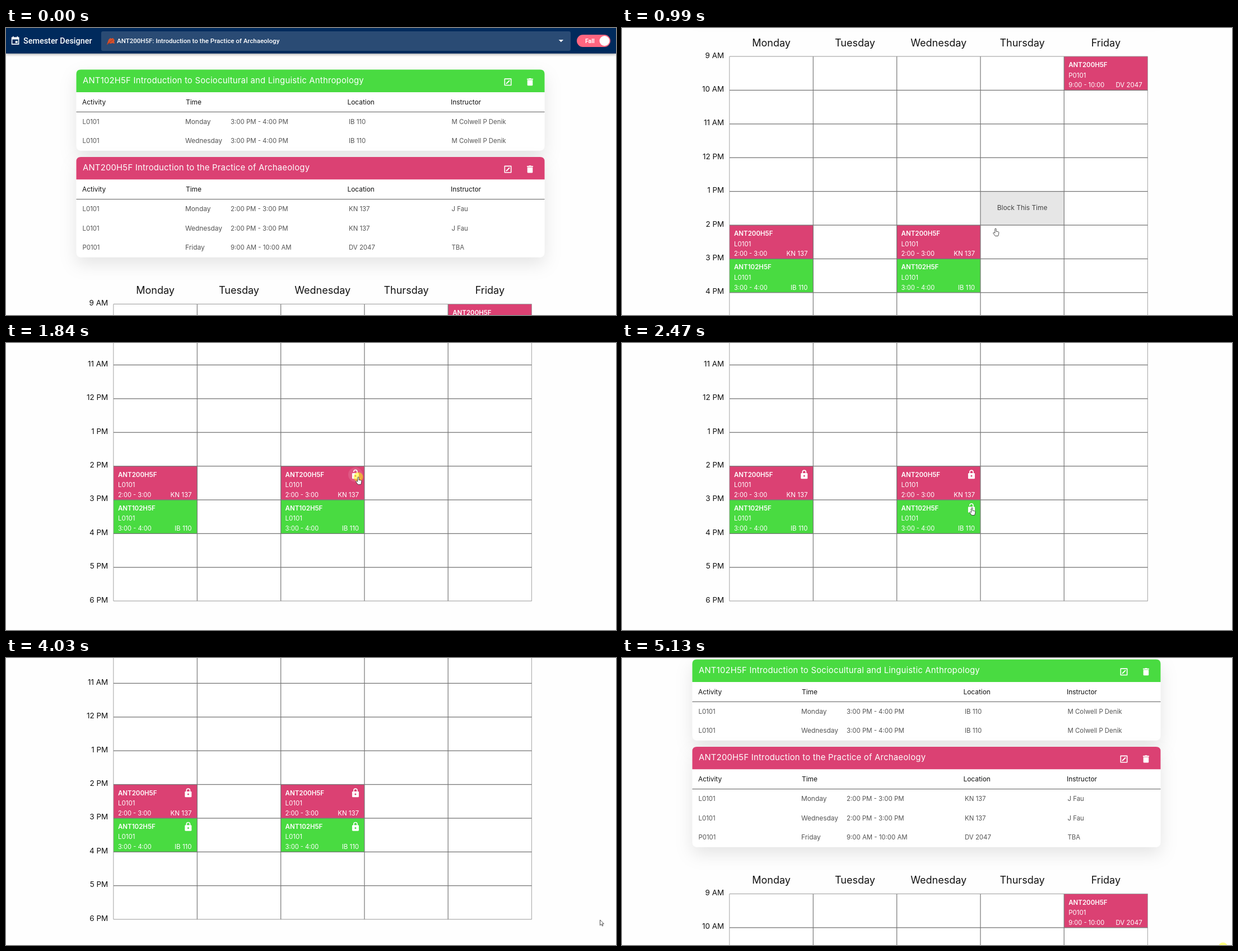
An HTML page that plays this animation: 1089 by 514 pixels, repeating every 5.22 s.

```html
<!DOCTYPE html>
<html lang="en">
<head>
<meta charset="utf-8">
<title>Timetable</title>
<style>
  html, body { margin: 0; width: 100%; height: 100%; overflow: hidden; background: #fefefe; }
  svg { display: block; width: 1089px; height: 514px; font-family: Inter, "Open Sans", sans-serif; }
  .bar { font-family: Roboto, Arial, sans-serif; font-weight: 500; }
  .card { filter: drop-shadow(0 12px 15px rgba(0, 0, 0, .1)); }
  .head { filter: drop-shadow(0 2px 2px rgba(0, 0, 0, .3)); }
</style>
</head>
<body>
<svg id="stage" viewBox="0 0 1089 514"></svg>
<script>
const GREEN = '#49db41', PINK = '#db4173';
const LOOP = 5220, STEP = 77.8, LEAD = 27;
const COL = 149.3, ROW = 60.4, GRID_X = 192, GRID_Y = 494.5;
const DAYS = ['Monday', 'Tuesday', 'Wednesday', 'Thursday', 'Friday'];

const text = (x, y, str, size = 11.5, fill = '#111', extra = '') =>
  `<text x="${x}" y="${y}" font-size="${size}" fill="${fill}" ${extra}>${str}</text>`;
const rect = (x, y, w, h, fill, extra = '') =>
  `<rect x="${x}" y="${y}" width="${w}" height="${h}" fill="${fill}" ${extra}/>`;
const path = (d, fill = 'none', extra = '') => `<path d="${d}" fill="${fill}" ${extra}/>`;
const circle = (x, y, r, fill, extra = '') =>
  `<circle cx="${x}" cy="${y}" r="${r}" fill="${fill}" ${extra}/>`;
const at = (x, y, body, extra = '') => `<g transform="translate(${x} ${y})" ${extra}>${body}</g>`;

function header() {
  const calendar = path('M10.6 17.5h12v11.4h-12z', 'none', 'stroke="#fff" stroke-width="1.6"') +
    rect(10, 16.5, 13.2, 4, '#fff') + rect(12, 14.8, 1.6, 3, '#fff') +
    rect(19.6, 14.8, 1.6, 3, '#fff') + rect(16.8, 23.2, 3.8, 3.8, '#fff');
  const leaf = path('M181 27l2-6 3-3 2 1 3-1 3 4-1 2 1 4-4-1-3 1-3-1-2 2-2 1z', '#d5502c') +
    path('M181 29l5-4 5-4', 'none', 'stroke="#8c2f1b" stroke-width=".8"');
  return rect(0, 0, 1089, 45.7, '#002a5c', 'class="head"') +
    `<g class="bar">${calendar}` +
    text(31, 28, 'Semester Designer', 14.4, '#fff') +
    rect(170, 6, 838, 35, '#2a4b74', 'rx="3"') + leaf +
    text(198, 27, 'ANT200H5F: Introduction to the Practice of Archaeology', 11.5, '#fff') +
    path('M986.7 21h8.4l-4.2 4.3z', '#fff') +
    rect(1019, 12, 60, 22, '#ff6680', 'rx="11"') +
    text(1034, 26.7, 'Fall', 10.5, '#fff', 'font-weight="700"') + circle(1068.5, 23, 9, '#fff') + '</g>';
}

function card(y, color, title, rows) {
  const h = 75.8 + rows.length * 34.7;
  const edit = path('M890.3 16.5h11.4v11.4h-11.4z', 'none', 'stroke="#fff" stroke-width="1.6" stroke-linejoin="round"') +
    path('M893 25.3l6-6', 'none', 'stroke="#fff" stroke-width="2"');
  const trash = path('M930 16.2h3l.8-.8h3.4l.8.8h3v1.6h-11zM930.7 18.7h9.6v8.6q0 1.4-1.4 1.4h-6.8q-1.4 0-1.4-1.4z', '#fff');
  let s = rect(125.5, 0, 836, h, '#fff', 'rx="8" class="card"') +
    path('M125.5 40.4v-32.4q0-8 8-8h820q8 0 8 8v32.4z', color) +
    text(137, 24.6, title, 14.8, '#fff', 'letter-spacing=".25"') + edit + trash +
    rect(125.5, 75.2, 836, 1.1, '#666');
  ['Activity', 'Time', 'Location', 'Instructor'].forEach((t, i) =>
    s += text([136, 321, 609.5, 794][i], 62.3, t, 11.9, '#111'));
  rows.forEach((row, r) => row.forEach((t, i) =>
    s += text([136.5, 320, 401, 612, 795.5][i], 97.3 + r * 34.6, t, i === 1 ? 11.9 : 11.4, '#555')));
  return at(0, y, s);
}

const blockPos = (day, hour) => [GRID_X + day * COL, GRID_Y + (hour - 9) * ROW];

function block(day, hour, color, code, activity, time, room) {
  return at(...blockPos(day, hour), rect(0, 0, COL, ROW, color) +
    text(8, 19, code, 11.5, '#fff', 'font-weight="600"') +
    text(8, 37.5, activity, 11.5, '#fff') + text(8, 55.3, time, 11.1, '#fff') +
    text(139.5, 55.3, room, 11.5, '#fff', 'text-anchor="end"'));
}

function lock(day, hour, color, open) {
  const [x, y] = blockPos(day, hour);
  const shackle = open ? 'M-6.3-4.5v-.5a3 3 0 0 1 6.2 0v3' : 'M-3.1-2v-2.3a3.1 3.1 0 0 1 6.2 0v2.3';
  return at(x + 133.3, y + 15, rect(-6, -2.6, 12, 10.4, '#fff', 'rx="1.4"') +
    path(shackle, 'none', `stroke="#fff" stroke-width="1.6" ${open ? 'transform="translate(3.1 0)"' : ''}`) +
    circle(0, 2.6, 1.5, color));
}

function glow(day, hour, alpha) {
  const [x, y] = blockPos(day, hour);
  return circle(x + 133.3, y + 15.3, 13, '#fff', `opacity="${alpha}"`);
}

function gridLines() {
  let s = '';
  for (let i = 0; i < 6; i++)
    s += rect(GRID_X - .6 + i * COL, GRID_Y, i % 5 ? 1.2 : .9, 9 * ROW, i % 5 ? '#777' : '#999');
  for (let i = 0; i < 10; i++) {
    const hour = (i + 8) % 12 + 1, y = GRID_Y + i * ROW;
    s += rect(GRID_X, y - .6, 5 * COL, i % 9 ? 1.3 : 1, i % 9 ? '#777' : '#999') +
      text(182.3, y + 2.5, `${hour} ${i < 3 ? 'AM' : 'PM'}`, 13.5, '#111', 'text-anchor="end"');
  }
  DAYS.forEach((d, i) => s += text(GRID_X + (i + .5) * COL, 476, d, 18, '#111', 'text-anchor="middle"'));
  return s;
}

const staff = 'M Colwell P Denik', tutor = 'J Fau';
const page = header() +
  card(74.6, GREEN, 'ANT102H5F Introduction to Sociocultural and Linguistic Anthropology',
    ['Monday', 'Wednesday'].map(d => ['L0101', d, '3:00 PM - 4:00 PM', 'IB 110', staff])) +
  card(230.9, PINK, 'ANT200H5F Introduction to the Practice of Archaeology', [
    ['L0101', 'Monday', '2:00 PM - 3:00 PM', 'KN 137', tutor],
    ['L0101', 'Wednesday', '2:00 PM - 3:00 PM', 'KN 137', tutor],
    ['P0101', 'Friday', '9:00 AM - 10:00 AM', 'DV 2047', 'TBA']]) +
  rect(GRID_X, GRID_Y, 5 * COL, 9 * ROW, '#fff') +
  '<g id="hover"></g>' +
  block(4, 9, PINK, 'ANT200H5F', 'P0101', '9:00 - 10:00', 'DV 2047') +
  [0, 2].map(d => block(d, 14, PINK, 'ANT200H5F', 'L0101', '2:00 - 3:00', 'KN 137') +
    block(d, 15, GREEN, 'ANT102H5F', 'L0101', '3:00 - 4:00', 'IB 110')).join('') +
  gridLines() + '<g id="locks"></g>';

const stage = document.getElementById('stage');
stage.innerHTML = `<g id="page">${page}</g><g id="pointer"></g>`;
const part = id => document.getElementById(id);

const ARROW = path('M0 0v9.8l2.3-2.1 1.6 3.4 1.5-.7-1.6-3.3h3.1z', '#fff', 'stroke="#222" stroke-width=".8"');
const HAND = path('M-1.2 8.2V1.2q0-1.2 1.1-1.2t1.1 1.2v4l3.6.7q1.3.3 1.2 1.6l-.5 3.4-1 2.6h-5l-3.4-4.7q-.6-1 .4-1.5.9-.3 1.5.4z',
  '#fff', 'stroke="#222" stroke-width=".8"');

// Keys are [step, value, ...], joined by straight lines
const SCROLL = [[0, 0], [6, 289], [7, 432], [11, 432], [13, 443.5], [15, 540], [17, 576],
  [51, 576], [52, 570], [53, 330], [54, 80], [55, 72]];
const POINTER = [[0, 1073, 518], [6, 711, 336], [10, 711, 336], [13, 667, 359], [17, 602, 246],
  [21, 629, 240], [25, 629, 240], [30, 624, 267], [32, 625, 295], [47, 625, 295],
  [52, 1060.5, 469], [56, 1060.5, 469], [60, 1073, 518]];

function track(keys, n) {
  const i = keys.findIndex(k => k[0] > n);
  if (i < 0) return keys[keys.length - 1].slice(1);
  const a = keys[i - 1], b = keys[i], f = (n - a[0]) / (b[0] - a[0]);
  return a.slice(1).map((v, j) => v + (b[j + 1] - v) * f);
}

function locks(n) {
  let s = '';
  if (n >= 20 && n < 29) s += glow(2, 14, .12);
  if (n >= 35 && n < 48) s += glow(2, 15, n < 40 ? .22 : .15);
  if (n >= 26) s += lock(0, 14, PINK) + lock(2, 14, PINK);
  else if (n >= 17) s += lock(2, 14, PINK, true);
  if (n >= 36) s += lock(0, 15, GREEN) + lock(2, 15, GREEN);
  else if (n >= 31) s += lock(2, 15, GREEN, true);
  return s;
}

function blockHint(n) {
  if (n < 7 || n > 13) return '';
  const [x, y] = blockPos(3, 13);
  return rect(x, y, COL, ROW, '#e6e6e6') +
    text(x + COL / 2, y + 33.7, 'Block This Time', 11.9, '#444', 'text-anchor="middle"');
}

let last = -1;
function draw(now) {
  const n = Math.floor((now % LOOP + LEAD) / STEP);
  if (n !== last) {
    last = n;
    const [x, y] = track(POINTER, n);
    const click = n === 24 || n === 25 || n === 35 || n >= 66;
    part('page').setAttribute('transform', `translate(0 ${-track(SCROLL, n)[0]})`);
    part('hover').innerHTML = blockHint(n);
    part('locks').innerHTML = locks(n);
    part('pointer').innerHTML = (click ? circle(x, y, 8.5, '#ff0', 'opacity=".5"') : '') +
      at(x, y, n >= 7 && n < 49 ? HAND : ARROW);
  }
}

const start = performance.now();
function tick() {
  draw(performance.now() - start);
  requestAnimationFrame(tick);
}
tick();
</script>
</body>
</html>
```
